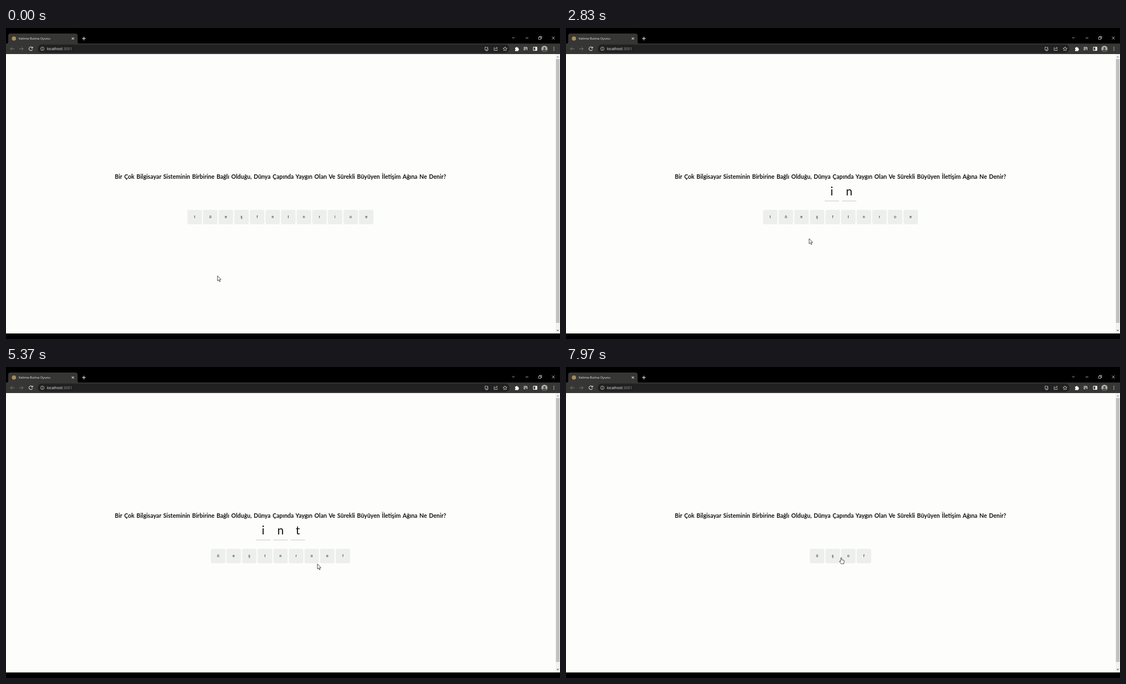
Recreate the animation shown at these times as an HTML page. Size 998 by 561 pixels, loop 8000 ms.

```html
<!DOCTYPE html>
<html lang="tr">
<head>
<meta charset="utf-8">
<title>Kelime Bulma Oyunu</title>
<style>
  html, body { margin: 0; width: 100%; height: 100%; overflow: hidden; background: #000; }
  svg { display: block; width: 100vw; height: 100vh; }
  .ui { font-family: "Open Sans", sans-serif; fill: #ededed; }
  .ask { font: 700 10.5px Lato, sans-serif; word-spacing: 1.1px; text-anchor: middle; fill: #111; }
  .slot text { font: 21px Lato, sans-serif; text-anchor: middle; }
  .key text { font: 6.9px "Liberation Sans", Arial, sans-serif; text-anchor: middle; fill: #1b1b1b; }
  .line { fill: none; stroke: #d6d6d6; stroke-width: .8; }
  .bold { stroke: #fff; stroke-width: 1; }
</style>
</head>
<body>
<svg viewBox="0 0 998 561">
  <rect width="998" height="561"/>
  <!-- tab strip -->
  <path d="M2 28Q4 28 4 25V14Q4 10 8 10H125Q129 10 129 14V25Q129 28 131 28Z" fill="#363635"/>
  <circle cx="14.3" cy="19" r="3.8" fill="#a98a5c"/>
  <text class="ui" x="23" y="21.2" font-size="5.8">Kelime Bulma Oyunu</text>
  <g class="line">
    <path class="bold" d="M118.5 17l4 4m0-4l-4 4M137 19h6.5m-3.2-3.2v6.5"/>
    <path d="M911.8 16.5l2.2 2.2 2.2-2.2M936 18h5M983.5 15.5l5 5m0-5l-5 5"/>
    <path d="M959.5 16.5h4v4h-4zM961 16.5V15h4v4h-1.5"/>
  </g>
  <!-- toolbar -->
  <rect y="28" width="998" height="19" fill="#363635"/>
  <rect x="57" y="29.8" width="850" height="15" rx="7.5" fill="#212122"/>
  <g class="line">
    <path d="M15 37.5H8m3.2-3.2L8 37.5l3.2 3.2M24 37.5h7m-3.2-3.2l3.2 3.2-3.2 3.2" stroke="#858585"/>
    <path class="bold" d="M47.4 35.5A3.3 3.3 0 1 0 47.8 38.5M48 33.8v2.4h-2.4"/>
    <circle cx="65.5" cy="37.5" r="3.1"/>
    <path d="M65.5 37v2.2m0-3.7v.7"/>
    <path d="M866 34.5h-3v5h5.5V38M864 41h4m-.5-7v3.2m-1.4-1.3l1.4 1.4 1.4-1.4"/>
    <path d="M880.5 35.5h-1.2v5h5.7v-2m-4 0q.3-2.5 4-2.7m-1.5-1.6l1.7 1.6-1.7 1.6"/>
    <path d="M899 34l1.1 2.3 2.5.3-1.8 1.7.4 2.5-2.2-1.2-2.2 1.2.4-2.5-1.8-1.7 2.5-.3z"/>
    <path class="bold" d="M932.5 35h6m-6 2.2h4.5m-4.5 2.2h3m3-4.4v4.8M950 34.5h6.5v6H950z"/>
  </g>
  <path d="M917 35.5h1.8a1.2 1.2 0 0 1 2.4 0h1.8v1.9a1.2 1.2 0 0 1 0 2.4v1.7h-6v-1.9a1.1 1.1 0 0 0 0-2.2zM953.5 34.5h3v6h-3z" fill="#fff"/>
  <circle cx="970" cy="37.5" r="5.5" fill="#b5aea3"/>
  <path d="M966 41.3q.6-2.8 4-2.8t4 2.8a5.5 5.5 0 0 1-8 0z" fill="#514c48"/>
  <circle cx="970" cy="36.4" r="2" fill="#514c48"/>
  <path d="M987 34.8v6" stroke="#e4e5e8" stroke-width="1.6" stroke-linecap="round" stroke-dasharray="0 2.7"/>
  <text class="ui" x="73.5" y="39.8" font-size="6.8">localhost<tspan fill="#949494">:3001</tspan></text>
  <!-- page -->
  <rect y="47" width="998" height="504" fill="#fdfdfb"/>
  <rect x="990" y="47" width="8" height="504" fill="#f1f1f1"/>
  <rect x="990.8" y="56" width="6.4" height="476" fill="#c1c1c2"/>
  <path d="M992 53l2-2.3 2 2.3z" fill="#8d8d8d"/>
  <path d="M992 544.8l2 2.3 2-2.3z" fill="#505050"/>
  <text class="ask" x="494.5" y="272.2">Bir Çok Bilgisayar Sisteminin Birbirine Bağlı Olduğu, Dünya Çapında Yaygın Olan Ve Sürekli Büyüyen İletişim Ağına Ne Denir?</text>
  <g id="slots"></g>
  <g id="keys"></g>
  <g id="cursor" stroke="#222" stroke-width=".8" stroke-linejoin="round" fill="#fff">
    <path id="arrow" d="M0 0V9.2L2.1 7.3 3.6 10.6 5 10 3.6 6.8H6.4Z"/>
    <path id="hand" d="M-.9 .8Q0-.6 .9 .8V4.2L4.6 5Q5.6 5.3 5.4 6.6L4.6 11.4H-.2L-3 7.6Q-3.2 6.2-2 6.4L-.9 7.4Z"/>
  </g>
</svg>
<script>
const LOOP = 8000, MID = 494.5, CELL = 26, HOLD = 100;
const $ = id => document.getElementById(id);

function make(tag, attrs, parent) {
  const el = document.createElementNS("http://www.w3.org/2000/svg", tag);
  for (const k in attrs) el.setAttribute(k, attrs[k]);
  return parent.appendChild(el);
}

// A row of equal cells centred on the page
function makeRow(parent, count, { name, top, radius, fill, line, base, pitch }) {
  const cells = Array.from({ length: count }, () => {
    const g = make("g", { class: name }, parent);
    const box = make("rect", { y: top, width: CELL, height: CELL, rx: radius, fill }, g);
    if (line) make("rect", { y: top + CELL - .2, width: CELL, height: 1.5, fill: line }, g);
    const text = make("text", { x: CELL / 2, y: base }, g);
    return { g, box, text };
  });
  const left = (i, n) => MID - ((n - 1) * pitch + CELL) / 2 + i * pitch;
  return {
    cells, left, top,
    show(letters) {
      cells.forEach((c, i) => {
        c.g.style.display = i < letters.length ? "" : "none";
        c.g.setAttribute("transform", `translate(${left(i, letters.length)} 0)`);
        c.text.textContent = letters[i] || "";
      });
    },
    hit(p, n) {
      const i = Math.floor((p.x - left(0, n)) / pitch);
      const inside = i >= 0 && i < n && p.x <= left(i, n) + CELL && p.y >= top && p.y <= top + CELL;
      return inside ? i : -1;
    }
  };
}

const slots = makeRow($("slots"), 8, { name: "slot", top: 285.5, radius: 0, fill: "none", line: "#d7d9e0", base: 301.5, pitch: 31.2 });
const keys = makeRow($("keys"), 12, { name: "key", top: 328, radius: 3, fill: "#edefed", base: 342.8, pitch: 28.1 });

// Clicks as [time, letter], with "-" giving the last letter back; the rest are way points
const moves = [[0, 381, 447], [450, 381, 447], [1530, 611, 348], [1850, "i"], [2150, 520, 425],
  [2500, "n"], [2830, 438, 380], [3200, "f"], [4000, "-"], [4350, 440, 395], [4700, "t"],
  [5370, 561, 355.3], [5650, "e"], [6250, "r"], [6800, "n"], [7200, "e"], [7700, "t"], [LOOP, 496, 343.5]];

function click({ pool, word }, letter) {
  if (letter === "-") return { pool: [...pool, word.at(-1)], word: word.slice(0, -1) };
  const i = pool.indexOf(letter), next = [...word, letter];
  return {
    pool: pool.filter((_, k) => k !== i),
    word: next.join("") === "internet" ? [] : next
  };
}

function aim({ pool, word }, letter) {
  if (letter === "-") return { x: slots.left(word.length - 1, word.length) + 16, y: slots.top + 23 };
  return { x: keys.left(pool.lastIndexOf(letter), pool.length) + 10, y: keys.top + 16 };
}

// Each stop holds the cursor place and the game from that moment on
let game = { pool: [..."töeşfntnrioe"], word: [] };
const stops = moves.map(([t, a, y]) => {
  if (y !== undefined) return { t, x: a, y, hold: 0, game };
  const place = aim(game, a);
  game = click(game, a);
  return { t, ...place, hold: HOLD, game };
});

function cursorAt(t, a, b) {
  const from = a.t + a.hold, to = b.t - b.hold;
  const u = Math.min(1, Math.max(0, (t - from) / (to - from)));
  const e = u * u * (3 - 2 * u);
  return { x: a.x + (b.x - a.x) * e, y: a.y + (b.y - a.y) * e };
}

function draw(t) {
  const next = stops.findIndex(s => s.t > t), now = stops[next - 1];
  const { pool, word } = now.game, p = cursorAt(t, now, stops[next]);
  keys.show(pool);
  slots.show(word);
  const over = slots.hit(p, word.length);
  slots.cells.forEach((c, i) => {
    c.box.setAttribute("fill", i === over ? "#e03033" : "none");
    c.text.setAttribute("fill", i === over ? "#fff" : "#111");
  });
  const hand = over >= 0 || keys.hit(p, pool.length) >= 0;
  $("hand").style.display = hand ? "" : "none";
  $("arrow").style.display = hand ? "none" : "";
  $("cursor").setAttribute("transform", `translate(${p.x} ${p.y})`);
}

const start = performance.now();
function tick() {
  draw((performance.now() - start) % LOOP);
  requestAnimationFrame(tick);
}
tick();
</script>
</body>
</html>
```
